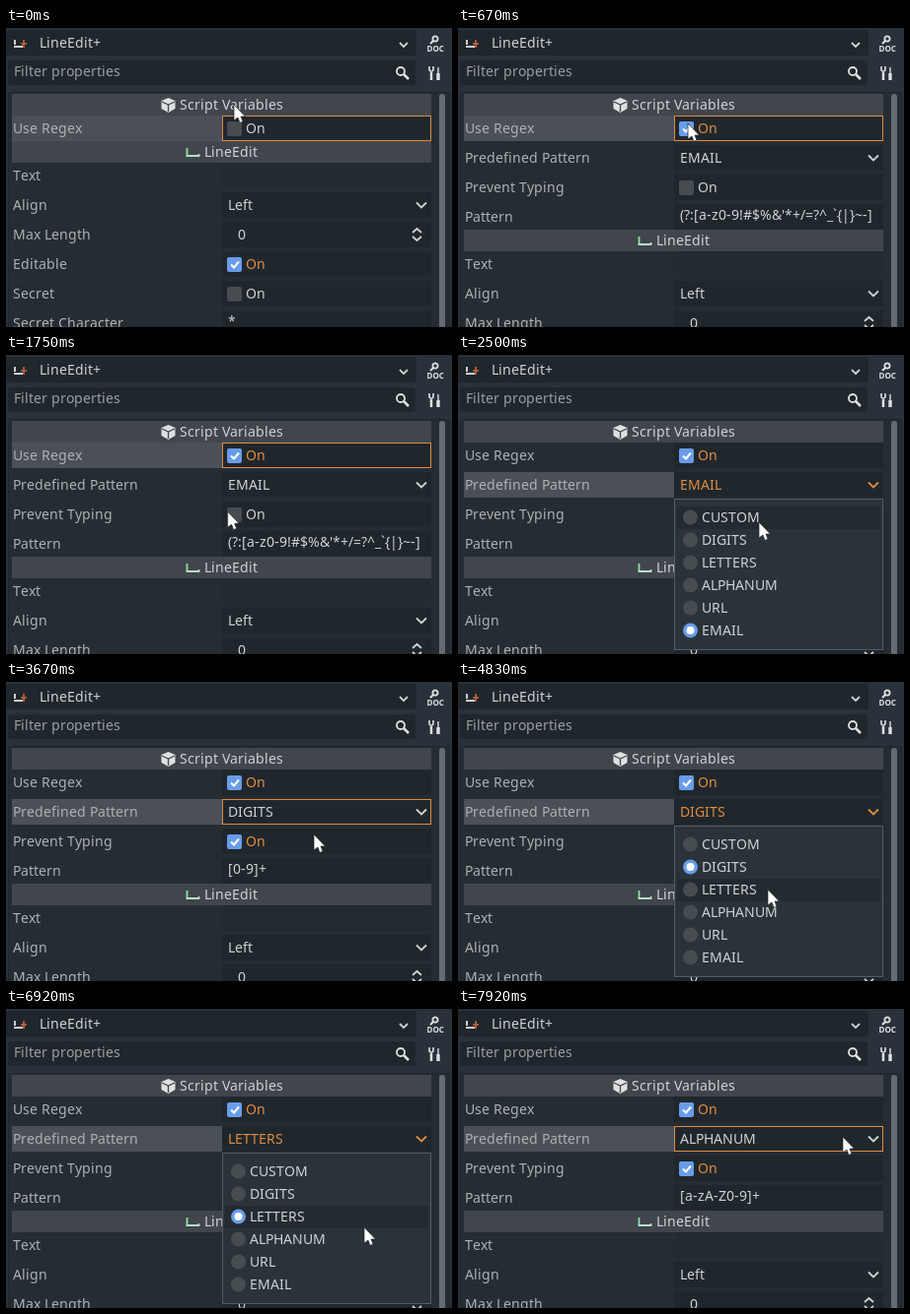
Recreate the animation shown at these times as an HTML page. Size 452x304 px, loop 8 s.

```html
<!DOCTYPE html>
<html lang="en">
<head>
<meta charset="utf-8">
<title>Inspector: regex line edit</title>
<style>
  html, body { margin: 0; width: 100%; height: 100%; overflow: hidden; background: #29313a; }
  svg { display: block; width: 452px; height: 304px; }
  text { font: 14px "Noto Sans", "Open Sans", sans-serif; font-variant-ligatures: none; white-space: pre; }
  .doc { font-size: 8px; font-weight: 900; }
</style>
</head>
<body>
<svg viewBox="0 0 452 304">
  <g id="view"></g>
  <path id="pointer" d="M0 0V16L4 13L6 18.500L9 17L7 12H11.500Z" fill="#fff" stroke="#20242a" stroke-width=".7"/>
</svg>
<script>
const LOOP = 8000, FPS = 12;
const ROW = 30, BAND = 24, ITEM = 23;            // vertical pitches
const LEFT = 6, SPLIT = 219, RIGHT = 431;        // property columns
const MENU = 154;                                // top of the first menu item
const C = {
  panel: '#252d33', field: '#20272c', empty: '#232a30', band: '#40464c', select: '#4b5057',
  label: '#adb0b3', value: '#cfd1d3', orange: '#df8b42', blue: '#699ce8',
  box: '#484c51', green: '#8fdfaa', icon: '#e0e0e0'
};
const ITEMS = ['CUSTOM', 'DIGITS', 'LETTERS', 'ALPHANUM', 'URL', 'EMAIL'];
const PATTERNS = {
  DIGITS: '[0-9]+', LETTERS: '[a-zA-Z]+', ALPHANUM: '[a-zA-Z0-9]+',
  EMAIL: "(?:[a-z0-9!#$%&'*+/=?^_`{|}~-]"
};
const FIRST = { regex: false, typing: false, pick: 'EMAIL', focus: 'regex', open: false };

// Pointer stops and what a click there changes; no place means rest
const STOPS = [
  { at: 0, to: [231, 78], set: FIRST },
  { at: 6, to: [233, 97], set: { regex: true } },
  { at: 11 },
  { at: 16, to: [145, 125] },
  { at: 22, to: [231, 162], set: { typing: true, focus: 'typing' } },
  { at: 26, to: [405, 131], set: { focus: 'pick', open: true } },
  { at: 29 },
  { at: 30, to: [305, 170] },
  { at: 32 },
  { at: 35, to: [232, 185] },
  { at: 37, set: { pick: 'DIGITS', open: false } },
  { at: 44, to: [312, 155] },
  { at: 56, to: [259, 129], set: { open: true } },
  { at: 58, to: [314, 211] },
  { at: 65, set: { pick: 'LETTERS', open: false } },
  { at: 72, to: [368, 118] },
  { at: 77 },
  { at: 79, to: [365, 132], set: { open: true } },
  { at: 83, to: [363, 222] },
  { at: 88, to: [361, 236], set: { pick: 'ALPHANUM', open: false } },
  { at: 95, to: [390, 130] }
];
STOPS.forEach((s, i) => { s.to = s.to || STOPS[i - 1].to; });

const pen = document.createElement('canvas').getContext('2d');
pen.font = '14px "Noto Sans", "Open Sans", sans-serif';
const escapes = { '&': '&amp;', '<': '&lt;', '>': '&gt;' };

// Glyphs advance by whole pixels
function text(s, x, y, fill = C.value) {
  const xs = [];
  for (const ch of s) {
    xs.push(x);
    x += Math.round(pen.measureText(ch).width);
  }
  return `<text x="${xs.join(' ')}" y="${y}" fill="${fill}">${s.replace(/[&<>]/g, c => escapes[c])}</text>`;
}
const rect = (x, y, w, h, fill, more = '') =>
  `<rect x="${x}" y="${y}" width="${w}" height="${h}" fill="${fill}" ${more}/>`;
const line = (d, color = C.icon, width = 1.8) =>
  `<path d="${d}" fill="none" stroke="${color}" stroke-width="${width}"/>`;
const circle = (x, y, r, fill) => `<circle cx="${x}" cy="${y}" r="${r}" fill="${fill}"/>`;
const ring = (x, y, r) =>
  `<circle cx="${x}" cy="${y}" r="${r}" fill="none" stroke="${C.icon}" stroke-width="1.8"/>`;
const chevron = (x, y, r, color = C.value) => line(`M${x - r} ${y - r / 2}l${r} ${r} ${r} ${-r}`, color);

// Property values, each drawn around a row centre
const entry = s => y => text(s, 225, y + 3);
const choice = (s, color) => y => text(s, 225, y + 5, color) + chevron(421, y, 5, color);
const check = on => y =>
  rect(224, y - 7, 15, 15, on ? C.blue : C.box, 'rx="2"') +
  (on ? line(`M228 ${y + 0.5}l3 3 5-6`, '#fff', 2) : '') +
  text('On', 243, y + 5, on ? C.orange : C.value);
const spin = s => y =>
  text(s, 235, y + 5) + line(`M412 ${y - 2}l4.5-4 4.5 4M412 ${y + 2}l4.5 4 4.5-4`, C.value);

function row(y, { label, value, focus, border }) {
  return (focus ? rect(LEFT, y - 13, SPLIT - LEFT, 26, C.select) : '') +
    rect(SPLIT, y - 13, RIGHT - SPLIT, 26, value ? C.field : C.empty) +
    (border ? rect(SPLIT + 0.5, y - 12.5, RIGHT - SPLIT - 1, 25, 'none', `stroke="${C.orange}"`) : '') +
    text(label, 7, y + 5, C.label) + (value ? value(y) : '');
}

function section(y, icon, title, x, rows) {
  return rect(LEFT, y - 11, RIGHT - LEFT, 22, C.band) + icon(y) + text(title, x, y + 5) +
    rows.map((r, i) => row(y + BAND + i * ROW, r)).join('');
}

const cube = y =>
  `<path d="M164.5 ${y - 7}l7 3v8l-7 4-7-4v-8Z" fill="${C.icon}"/>` +
  line(`M158 ${y - 3}l6.500 3 6.500-3M164.500 ${y}v7`, C.band, 1.3);
const editIcon = y =>
  line(`M183.5 ${y - 4}v7`, C.green) + line(`M182.5 ${y + 4}h13v-2`, '#b9dec5');

const header =
  rect(0, 2, 416, 26, C.field, 'rx="2"') +
  line('M9 12v5') + line('M8 19h9') +
  line('M18 12v8M15 16h6', '#c9683f', 1.6) +
  text('LineEdit+', 34, 20) + chevron(403, 17, 4) +
  ring(435, 11, 2.6) + line('M433 13l-3 3', C.icon, 2) +
  `<text class="doc" x="426.5" y="24" fill="${C.icon}">DOC</text>` +
  rect(2, 33, 413, 25, C.field, 'rx="2"') +
  text('Filter properties', 8, 49, '#9a9ea2') +
  ring(400, 44, 4) + line('M403 47l5 5', C.icon, 2.5) +
  line('M431 45v8', C.icon, 2.5) + line('M429 39v3q0 2 2 2t2-2v-3', C.icon, 1.6) +
  line('M438 40v6', C.icon, 1.4) + line('M438 46v7', C.icon, 3.4);

const frame =
  rect(2, 65, 448, 239, C.panel) +
  line('M2.5 304V65.5H449.5V304', C.field, 1) +
  rect(439, 67, 6, 245, '#656b71', 'rx="3"');

function popup(pick, hover) {
  return rect(SPLIT + 0.5, 146.5, RIGHT - SPLIT - 1, 153, '#2b333a', 'stroke="#545d65"') +
    ITEMS.map((name, i) => {
      const top = MENU + i * ITEM, y = top + 11, on = name === pick;
      return (i === hover ? rect(222, top, 206, ITEM, C.empty) : '') +
        circle(235.5, y, 7.5, on ? C.blue : C.box) +
        (on ? circle(235.5, y, 4, '#fff') : '') +
        text(name, 247, y + 5);
    }).join('');
}

function draw(s) {
  const mark = name => ({ focus: s.focus === name, border: s.focus === name && !s.open });
  const script = [{ label: 'Use Regex', value: check(s.regex), ...mark('regex') }];
  if (s.regex) script.push(
    { label: 'Predefined Pattern', value: choice(s.pick, s.open ? C.orange : C.value), ...mark('pick') },
    { label: 'Prevent Typing', value: check(s.typing), ...mark('typing') },
    { label: 'Pattern', value: entry(PATTERNS[s.pick]) }
  );
  const base = [
    { label: 'Text' },
    { label: 'Align', value: choice('Left', C.value) },
    { label: 'Max Length', value: spin('0') },
    { label: 'Editable', value: check(true) },
    { label: 'Secret', value: check(false) },
    { label: 'Secret Character', value: entry('*') }
  ];
  const top = 78, next = top + 2 * BAND + (script.length - 1) * ROW;
  return header + frame +
    section(top, cube, 'Script Variables', 176, script) +
    section(next, editIcon, 'LineEdit', 201, base) +
    (s.open ? popup(s.pick, s.hover) : '');
}

function pointerAt(step) {
  const i = STOPS.findIndex(s => s.at > step);
  if (i < 0) return STOPS[STOPS.length - 1].to;
  const a = STOPS[i - 1], b = STOPS[i];
  const k = (step - a.at) / (b.at - a.at), ease = k * k * (3 - 2 * k);
  return a.to.map((v, j) => v + (b.to[j] - v) * ease);
}

function stateAt(step, [x, y]) {
  const s = Object.assign({}, ...STOPS.filter(p => p.at <= step).map(p => p.set));
  s.hover = s.open && x > SPLIT && x < RIGHT ? Math.floor((y - MENU) / ITEM) : -1;
  return s;
}

const view = document.getElementById('view');
const pointer = document.getElementById('pointer');
const start = performance.now();
let shown = '';

function tick() {
  const time = (performance.now() - start) % LOOP;
  const step = Math.floor((time + 5) * FPS / 1000) % (LOOP * FPS / 1000);
  const tip = pointerAt(step), state = stateAt(step, tip);
  const key = JSON.stringify(state);
  if (key !== shown) {
    view.innerHTML = draw(state);
    shown = key;
  }
  pointer.setAttribute('transform', `translate(${tip})`);
  requestAnimationFrame(tick);
}
tick();
</script>
</body>
</html>
```
